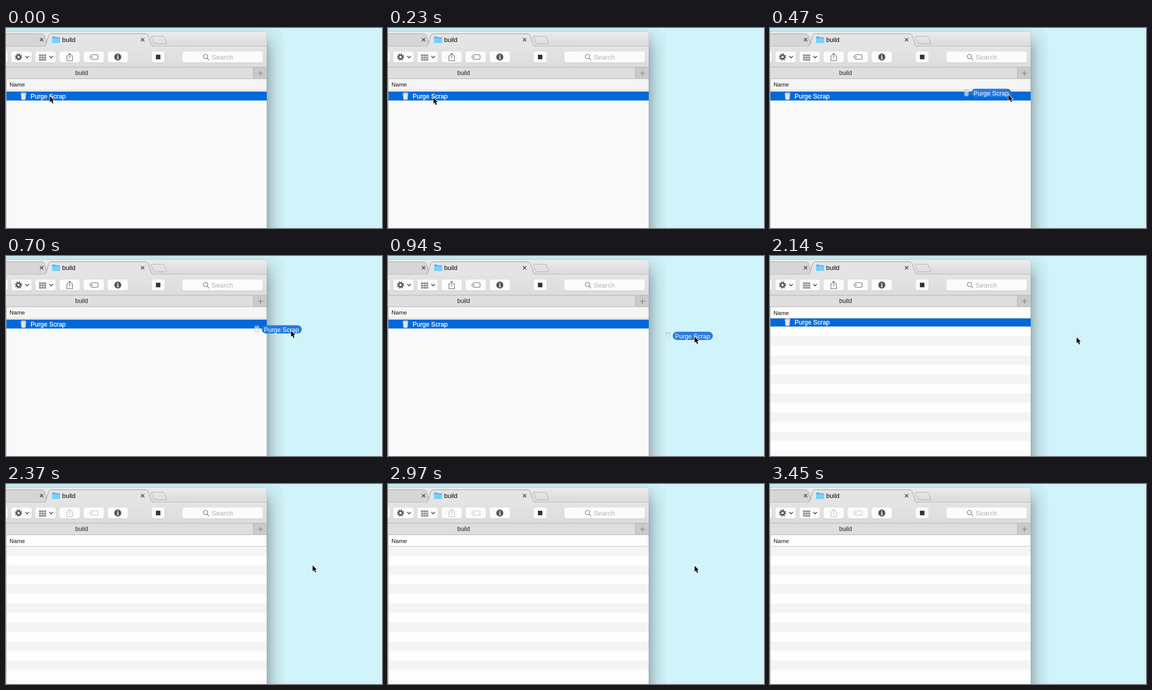
An HTML page that plays this animation: 750x400 px, repeating every 3.69 s.

```html
<!DOCTYPE html>
<html lang="en">
<head>
<meta charset="utf-8">
<title>File window</title>
<style>
  html, body { margin: 0; width: 100%; height: 100%; overflow: hidden; background: #d1f3fa; }
  #stage { position: relative; width: 100%; height: 100%; overflow: clip; contain: strict; }
  #shadow {
    position: absolute; left: -100px; top: 8px; width: 620px; height: 500px;
    border-radius: 0 5px 0 0;
    box-shadow: 0 18px 32px rgba(0,0,0,.48), 0 28px 0 34px rgba(0,0,0,.018), 0 0 1px rgba(0,0,0,.5);
  }
  svg { position: absolute; left: 0; top: 0; display: block; }
  text { font-family: "Liberation Sans", Arial, sans-serif; }
  .line { fill: none; }
  .glyph { fill: none; stroke: #666; stroke-width: 1.1; }
  .stroke { fill: none; stroke: #444; stroke-width: 1.5; }
  .file { font-size: 12.6px; fill: #fff; }
</style>
</head>
<body>
<div id="stage">
<div id="shadow"></div>
<svg width="750" height="400" viewBox="0 0 750 400">
  <defs>
    <linearGradient id="tabBar" x2="0" y2="1"><stop stop-color="#ebebeb"/><stop offset="1" stop-color="#dadada"/></linearGradient>
    <linearGradient id="toolBar" x2="0" y2="1"><stop stop-color="#e4e4e4"/><stop offset="1" stop-color="#dcdcdc"/></linearGradient>
    <linearGradient id="tin"><stop stop-color="#d3d5d6"/><stop offset=".45" stop-color="#ededed"/><stop offset="1" stop-color="#d0d3d4"/></linearGradient>
    <clipPath id="listArea"><rect x="1" y="125" width="519" height="275"/></clipPath>
    <g id="bin">
      <path d="M1 4 3.500 28Q10.500 30 17.500 28L20 4Z" fill="url(#tin)" stroke="#c6cacc" stroke-width=".7"/>
      <path d="M6 9 7 26M10.500 9V27M15 9 14 26" stroke="#dcdede" fill="none"/>
      <ellipse cx="10.500" cy="4" rx="9.500" ry="2.800" fill="#8b8b8a" stroke="#dfe2e2"/>
      <path d="M3 4 6 1 9 3 12 0 14 3 17 2 18 5 10 6.500Z" fill="#e9e9e6"/>
      <path d="M4 4 6 2.500 7.500 5ZM9 4.500 11 2 12 5ZM14 3 16 4 14 5.500Z" fill="#5c5c5c"/>
    </g>
    <path id="cross" class="stroke" d="M-3.300-3.300 3.300 3.300M3.300-3.300-3.300 3.300"/>
    <path id="chevron" class="stroke" d="M-3.500-2 0 1.800 3.500-2"/>
  </defs>

  <!-- Tabs -->
  <path d="M0 8H515Q520 8 520 13V37H0Z" fill="url(#tabBar)"/>
  <path d="M0 8.500H515" stroke="#f5f5f5"/>
  <path d="M0 11.500H72C79 11.500 78 30 83 36.500H0Z" fill="#d6d6d6"/>
  <path class="line" d="M0 11.500H72C79 11.500 78 29 82 33" stroke="#a6a6a6"/>
  <path class="line" d="M0 36.500H520" stroke="#b8b8b8"/>
  <path d="M76 37.500C83 36 82 11.500 90 11.500H279C287 11.500 286 36 294 37.500Z" fill="#e4e4e4"/>
  <path class="line" d="M76 36.500C83 36 82 11.500 90 11.500H279C287 11.500 286 36 294 36.500" stroke="#999"/>
  <path class="line" d="M291 16.500H313Q315 16.500 316 18.500L320.500 29Q321.500 31.500 319 31.500H298Q296 31.500 295 29.500L290 18.500Q289 16.500 291 16.500Z" stroke="#b0b0b0"/>
  <use href="#cross" x="71" y="23.500"/><use href="#cross" x="272.500" y="23.500"/>
  <path d="M92 18.500Q92 17 93.500 17H97L99 18.500H106.500Q108 18.500 108 20V28.500Q108 30 106.500 30H93.500Q92 30 92 28.500Z" fill="#52b5e8"/>
  <path d="M92 20.500H108V28.500Q108 30 106.500 30H93.500Q92 30 92 28.500Z" fill="#76d0fa"/>
  <text x="112" y="28" font-size="12.500">build</text>

  <!-- Toolbar -->
  <rect y="37" width="520" height="42" fill="url(#toolBar)"/>
  <g id="buttons"></g>
  <circle cx="25" cy="58" r="3.800" fill="none" stroke="#5c5c5c" stroke-width="3"/>
  <circle cx="25" cy="58" r="6" fill="none" stroke="#5c5c5c" stroke-width="2.400" stroke-dasharray="2.356"/>
  <use href="#chevron" x="42" y="58"/><use href="#chevron" x="90" y="58"/>
  <g id="grid" class="glyph"></g>
  <g id="fileTools" class="glyph">
    <path d="M124.500 55.500H121.500V65.500H132.500V55.500H129.500M127 61V50.500M124 53.500 127 50.500 130 53.500"/>
    <path d="M167 58 171 53.500H182Q183.500 53.500 183.500 55V61Q183.500 62.500 182 62.500H171Z"/>
    <circle cx="171.500" cy="58" r=".7"/>
  </g>
  <circle cx="223" cy="58" r="7" fill="#555"/>
  <path d="M223 53.300V55.300M221.500 57H223.300V61.500M221.300 61.500H225" fill="none" stroke="#fff" stroke-width="1.600"/>
  <rect x="299" y="53.500" width="9" height="9" fill="#333"/>
  <circle cx="398" cy="57" r="4.300" class="glyph"/><path class="glyph" d="M401 60.200 405 64.500"/>
  <text x="410" y="63" font-size="13.500" fill="#b3b3b3">Search</text>

  <!-- Folder bar and list -->
  <rect y="78" width="520" height="24" fill="#dedede"/>
  <rect x="493" y="79" width="27" height="22" fill="#cacaca"/>
  <path class="line" d="M0 78.500H520M0 101.500H520M493.500 79V101" stroke="#b2b2b2"/>
  <path d="M502.500 90.500H513M507.500 85.500V96" stroke="#777"/>
  <text x="138" y="94" font-size="12" fill="#222">build</text>
  <rect id="header" y="102" width="520" height="22"/>
  <text id="heading" x="7" font-size="11.500" fill="#111">Name</text>
  <rect y="124" width="520" height="276" fill="#f9f9f9"/>
  <g clip-path="url(#listArea)">
    <g id="stripes"></g>
    <g id="row">
      <rect y="125" width="520" height="2" fill="#fefefe"/>
      <rect y="127" width="520" height="18" fill="#0069d9"/>
      <use href="#bin" transform="translate(29 128.500) scale(.56 .52)"/>
      <text class="file" x="49" y="141" stroke="#fff" stroke-width=".3">Purge Scrap</text>
    </g>
  </g>
  <path class="line" d="M0 124.500H520" stroke="#c6c6c6"/>
  <path class="line" d="M518.500 103V124" stroke="#dcdcdc"/>
  <path class="line" d="M.5 102V400" stroke="#b0b0b0"/>

  <!-- Dragged and dropped file -->
  <g id="drag">
    <rect x="15" y="-8.500" width="80" height="16.500" rx="8.200" fill="#267ae0"/>
    <text class="file" x="19.500" y="4.500">Purge Scrap</text>
  </g>
  <use id="looseBin" href="#bin"/>
  <g id="label">
    <rect x="569.500" y="149.500" width="76" height="16" rx="3" fill="#267ae0"/>
    <text x="607.500" y="161.500" font-size="11.600" font-weight="bold" text-anchor="middle" fill="#fff">Purge Scrap</text>
  </g>
  <path id="cursor" d="M.6 1.400V13.600L3.300 11 5.500 16 7.500 15.100 5.400 10.200H9Z" stroke="#fff" stroke-width="1.800" paint-order="stroke"/>
</svg>
</div>
<script>
const LOOP = 3690;
const el = id => document.getElementById(id);
const place = (node, x, y, scale = '1') =>
  node.setAttribute('transform', `translate(${x} ${y}) scale(${scale})`);
const show = (node, opacity) => node.setAttribute('opacity', Number(opacity));
const mix = (a, b, k) => a + (b - a) * k;

function addRect(parent, x, y, width, height, attributes = {}) {
  const rect = document.createElementNS('http://www.w3.org/2000/svg', 'rect');
  for (const [name, value] of Object.entries({ x, y, width, height, ...attributes }))
    rect.setAttribute(name, value);
  el(parent).append(rect);
}

for (const [x, width] of [[-37, 40], [11, 40], [59, 40], [107, 40], [155, 40], [203, 40], [291, 25], [352, 160]]) {
  addRect('buttons', x, 47.5, width, 22.5, { rx: 4, fill: '#c9c9c9' });
  addRect('buttons', x, 47, width, 22, { rx: 4, fill: '#fbfbfb' });
}
for (let i = 0; i < 9; i++)
  addRect('grid', 66.5 + i % 3 * 5, 53.5 + Math.floor(i / 3) * 4.5, 3, 2);
addRect('stripes', 0, 120, 520, 272, { fill: '#fefefe' });
for (let y = 125; y < 390; y += 38)
  addRect('stripes', 0, y, 520, 18.5, { fill: '#f4f4f4' });

// The screen refreshes in steps: [time, x, y], each held until the next.
const cursorPath = [
  [0, 87, 135], [120, 90, 138], [240, 108, 145], [350, 438, 128], [470, 475, 132],
  [580, 532, 140], [700, 568, 148], [820, 600, 157], [940, 611, 160], [1180, 611, 161],
  [2970, 611, 162], [3090, 622, 188], [3210, 652, 272], [3330, 686, 356]
];
const dragPath = [
  [240, 50, 144], [350, 330, 124], [470, 386.5, 130], [580, 459, 138],
  [700, 495, 147], [820, 537, 157], [940, 553, 160]
];
const held = (path, t) => path.findLast(step => step[0] <= t) ?? path[0];

function draw(t) {
  const [, cursorX, cursorY] = held(cursorPath, t);
  place(el('cursor'), cursorX, cursorY);
  show(el('cursor'), t < 3450);

  const [, dragX, dragY] = held(dragPath, t);
  const drop = t < 1180 ? 0 : Math.min(3, Math.floor((t - 1180) / 120) + 1) / 3;
  const loose = t >= 240 && t < 2140;
  place(el('drag'), dragX, dragY);
  show(el('drag'), loose ? 1 - drop : 0);
  show(el('label'), loose ? drop : 0);
  show(el('looseBin'), loose ? mix(.7, 1, drop) : 0);
  place(el('looseBin'), mix(dragX, 596.5, drop), mix(dragY - 8, 115, drop),
    `${mix(.52, 1, drop)} ${mix(.5, 1, drop)}`);

  const removing = t >= 2140, removed = t >= 2370;
  place(el('row'), 0, !removing ? 0 : t < 2260 ? -4 : -11);
  show(el('row'), !removed);
  place(el('stripes'), 0, removed ? 0 : t < 2260 ? -2 : -1);
  show(el('stripes'), removing);
  show(el('fileTools'), removed ? .4 : 1);
  el('header').setAttribute('fill', removing ? '#fdfdfd' : '#f5f5f5');
  el('heading').setAttribute('y', removing ? 118 : 117);
}

const start = performance.now();
function tick() {
  draw((performance.now() - start) % LOOP);
  requestAnimationFrame(tick);
}
tick();
</script>
</body>
</html>
```
